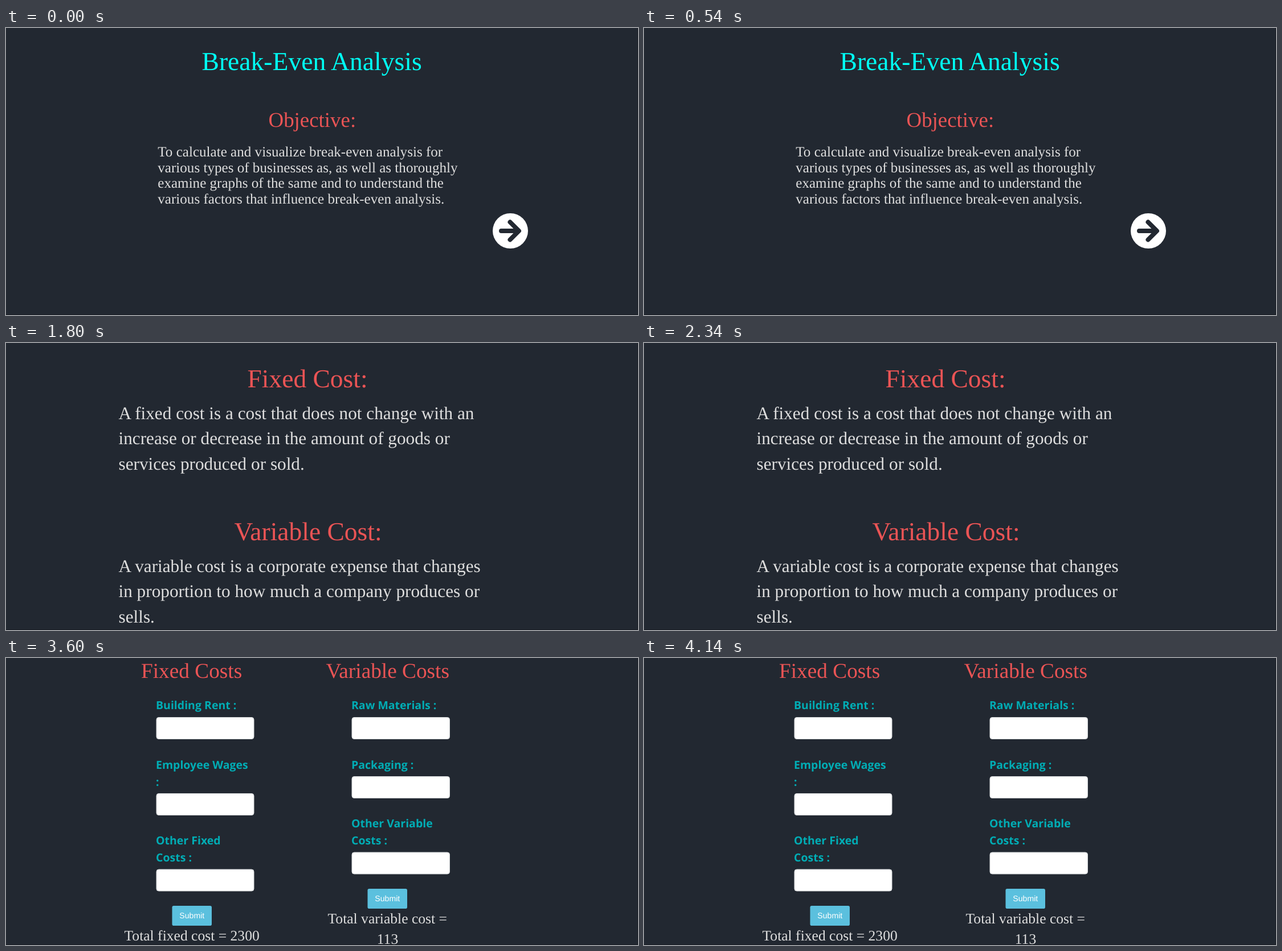
Animation of 1109x505 px, one loop 4.5 s. Source, as an HTML page:

```html
<!DOCTYPE html>
<html lang="en">
<head>
<meta charset="utf-8">
<title>Break-Even Analysis</title>
<style>
  html, body { margin: 0; width: 100%; height: 100%; overflow: hidden; background: #222831; }
  svg { display: block; width: 1109px; height: 505px; }
  text { white-space: pre; text-rendering: geometricPrecision; }
  .serif { font-family: "Liberation Serif", "Times New Roman", serif; }
  .label { font-family: "Open Sans", "Noto Sans", sans-serif; font-weight: 700; fill: #00adb5; }
  .ui { font-family: "Liberation Sans", Arial, sans-serif; }
  .title { fill: #00fff5; }
  .head { fill: #ea5455; }
  .body { fill: #dedede; }
  .slide { visibility: hidden; animation: show 4.5s step-end infinite; animation-delay: calc(var(--i) * .9s); }
  @keyframes show { 0% { visibility: visible; } 20%, 100% { visibility: hidden; } }
</style>
</head>
<body>
<svg id="stage" viewBox="0 0 1109 505" xmlns="http://www.w3.org/2000/svg"></svg>
<script>
const NS = "http://www.w3.org/2000/svg";
const stage = document.getElementById("stage");
let parent = stage;

function add(tag, attrs, content) {
  const el = document.createElementNS(NS, tag);
  for (const key in attrs) el.setAttribute(key, attrs[key]);
  if (content !== undefined) el.textContent = content;
  parent.appendChild(el);
  return el;
}

const rect = (x, y, width, height, fill, more) => add("rect", { x, y, width, height, fill, ...more });
const path = (d, stroke, width, more) =>
  add("path", { d, fill: "none", stroke, "stroke-width": width, ...more });
const text = (cls, size, x, y, content, more) =>
  add("text", { class: cls, "font-size": size, x, y, ...more }, content);
const lines = (cls, size, x, y, step, rows) =>
  rows.forEach((row, i) => text(cls, size, x, y + i * step, row));

function slide(index, draw) {
  parent = stage;
  parent = add("g", { class: "slide", style: `--i:${index}` });
  draw();
  parent = stage;
}

function arrow(x, y, radius) {
  const transform = `translate(${x} ${y}) scale(${radius / 31})`;
  add("circle", { r: 31, fill: "#fff", transform });
  path("M-16 0H14M-.5-15.5L15 0L-.5 15.5", "#222831", 8,
    { transform, "stroke-linecap": "round", "stroke-linejoin": "round" });
}

function button(x, y, width, height, size, fill = "#5bc0de") {
  rect(x, y, width, height, fill, { rx: size / 5 });
  text("ui", size, x + width / 2, y + height / 2 + size * .35, "Submit",
    { fill: "#fff", "text-anchor": "middle" });
}

const field = (x, y, width, height, rx) =>
  rect(x + .5, y + .5, width - 1, height - 1, "#fff", { rx, stroke: "#d5d8da" });

function numberField(y) {
  rect(611.5, y, 83.5, 18, "#fff", { rx: 1, stroke: "#9a9da0", "stroke-width": .8 });
  rect(679, y + 2, 13, 14.5, "#ececec");
  path(`M683 ${y + 7}l2.5-2.5 2.5 2.5M683 ${y + 11.5}l2.5 2.5 2.5-2.5`, "#777", 1);
}

function chart() {
  const left = 136.5, right = 564.5, base = 423, ticks = 14;
  const maxUnits = 63.518, fixed = 2300, unitCost = 11.3, price = 62;
  const breakEven = fixed / (price - unitCost);
  const tickX = i => left + (right - left) * i / ticks;
  const px = units => left + (right - left) * units / maxUnits;
  const py = value => base - value * .033;
  const point = (units, value) => `${px(units)} ${py(value)}`;
  const pink = "#ff6384", blue = "#36a2eb", teal = "#4bc0c0", cyan = "#36d6ea";
  const gray = { fill: "#666" };

  rect(89, 233, 489.5, 244, "#ffeddc");

  const legend = [
    ["Fixed Cost", 147, 243, pink, 3],
    ["Total Revenue", 269, 243, blue, 3],
    ["Total Cost", 412, 243, teal, 3],
    ["Break-Even Point", 258, 266.5, cyan, 1.2]
  ];
  for (const [name, x, y, color, width] of legend) {
    rect(x + 1, y + 1, 43, 13, color, { "fill-opacity": .2, stroke: color, "stroke-width": width });
    text("ui", 13, x + 50, y + 11.5, name, gray);
  }

  for (let i = 0; i <= ticks; i++) {
    const x = tickX(i);
    path(`M${x} 291V431`, "#000", 1, { opacity: .1 });
    const units = i === 10 ? 45.365 : i > 10 ? maxUnits - (ticks - i) * 4.537 : i * 4.537;
    text("ui", 13, 0, 4.6, i ? units.toFixed(3) : "0",
      { ...gray, "text-anchor": "end", transform: `translate(${x + 5} 441.5) rotate(-44)` });
  }
  for (let value = 0; value <= 4000; value += 1000) {
    path(`M128 ${py(value)}H${right}`, "#000", 1, { opacity: .1 });
    text("ui", 13, 124.5, py(value) + 4.5, value.toLocaleString("en-US"),
      { ...gray, "text-anchor": "end" });
  }

  const cross = point(breakEven, breakEven * price);
  const costEnd = point(maxUnits, fixed + unitCost * maxUnits);
  const revenueEnd = point(maxUnits, price * maxUnits);
  const areas = [
    [`M${point(0, 0)}L${point(0, fixed)}L${cross}Z`, "#faafd9"],
    [`M${cross}L${revenueEnd}L${costEnd}Z`, "#b8cffb"]
  ];
  for (const [d, fill] of areas) add("path", { d, fill, opacity: .93 });

  const round = { "stroke-linecap": "round" };
  path(`M${point(0, fixed)}L${costEnd}`, teal, 1.8);
  path(`M${point(0, 0)}L${revenueEnd}`, blue, 3.2, round);
  path(`M${point(0, fixed)}H${right}`, pink, 3.2, round);
  add("circle", { cx: px(breakEven), cy: py(breakEven * price), r: 5.3,
    fill: cyan, "fill-opacity": .2, stroke: cyan, "stroke-width": 1.2 });
}

slide(0, () => {
  text("serif title", 45.6, 343.5, 74.4, "Break-Even Analysis");
  text("serif head", 36.9, 460.5, 174, "Objective:");
  lines("serif body", 25.1, 266.3, 226, 27.5, [
    "To calculate and visualize break-even analysis for",
    "various types of businesses as, as well as thoroughly",
    "examine graphs of the same and to understand the",
    "various factors that influence break-even analysis."
  ]);
  arrow(885, 357, 31);
});

slide(1, () => {
  text("serif title", 29.1, 293.5, 79.5, "Calculating the Total Revenue and Net Profit");
  text("label", 12.6, 442.5, 155, "Selling Price per unit :");
  text("label", 12.6, 442.5, 209, "Quantity sold :");
  numberField(142);
  numberField(196);
  button(536, 248, 37.5, 20.5, 7.5, "#31b0d5");
  text("serif body", 16, 477, 286, "Total revenue = 620.000");
  text("serif body", 16, 482, 316, "Net Profit = -1793.000");
  arrow(854.3, 349, 19.7);
});

slide(2, () => {
  text("serif head", 45.5, 423.5, 78, "Fixed Cost:");
  lines("serif body", 31.25, 197.5, 133.5, 44.5, [
    "A fixed cost is a cost that does not change with an",
    "increase or decrease in the amount of goods or",
    "services produced or sold."
  ]);
  text("serif head", 45.5, 400.5, 347, "Variable Cost:");
  lines("serif body", 31.25, 197.5, 402.5, 44.5, [
    "A variable cost is a corporate expense that changes",
    "in proportion to how much a company produces or",
    "sells."
  ]);
});

slide(3, () => {
  text("serif title", 43.15, 158.5, 82, "Plotting the Break-even analysis graph");
  text("serif body", 23.7, 72.8, 147.5, "Break even point (in units) = 45.365");
  text("serif body", 23.7, 72.8, 192.5, "Break even point (in sales) = 2812.623");
  chart();
  text("serif body", 23.7, 611.5, 258, "To replot the graph, fill the following details :");
  lines("label", 18.8, 623.5, 312, 58.7, ["Total fixed cost :", "Variable cost per unit :", "Selling Price :"]);
  for (const y of [292.5, 351.5, 410.5]) field(875.5, y, 188.5, 28, 0);
  button(824, 455, 63.5, 31.5, 13.2);
});

slide(4, () => {
  text("serif head", 37.3, 237, 34.5, "Fixed Costs");
  text("serif head", 37.3, 561.5, 34.5, "Variable Costs");
  text("label", 19.5, 263, 90, "Building Rent :");
  lines("label", 19.5, 263, 194.5, 30, ["Employee Wages", ":"]);
  lines("label", 19.5, 263, 328, 30, ["Other Fixed", "Costs :"]);
  text("label", 19.5, 606, 90, "Raw Materials :");
  text("label", 19.5, 606, 194.5, "Packaging :");
  lines("label", 19.5, 606, 298, 30, ["Other Variable", "Costs :"]);
  for (const y of [104, 238, 371.5]) field(263.5, y, 172, 39, 4);
  for (const y of [104, 208, 341.5]) field(606.5, y, 172.5, 39, 4);
  button(291.5, 436, 69.5, 35, 14.1);
  button(634.5, 406, 69.5, 35, 14.1);
  text("serif body", 25.6, 207.5, 497, "Total fixed cost = 2300");
  text("serif body", 25.6, 564.5, 467, "Total variable cost =");
  text("serif body", 25.6, 669.5, 502.5, "113", { "text-anchor": "middle" });
});

path("M0 504.5H1108.5V0", "#171b22", 1);
</script>
</body>
</html>
```
